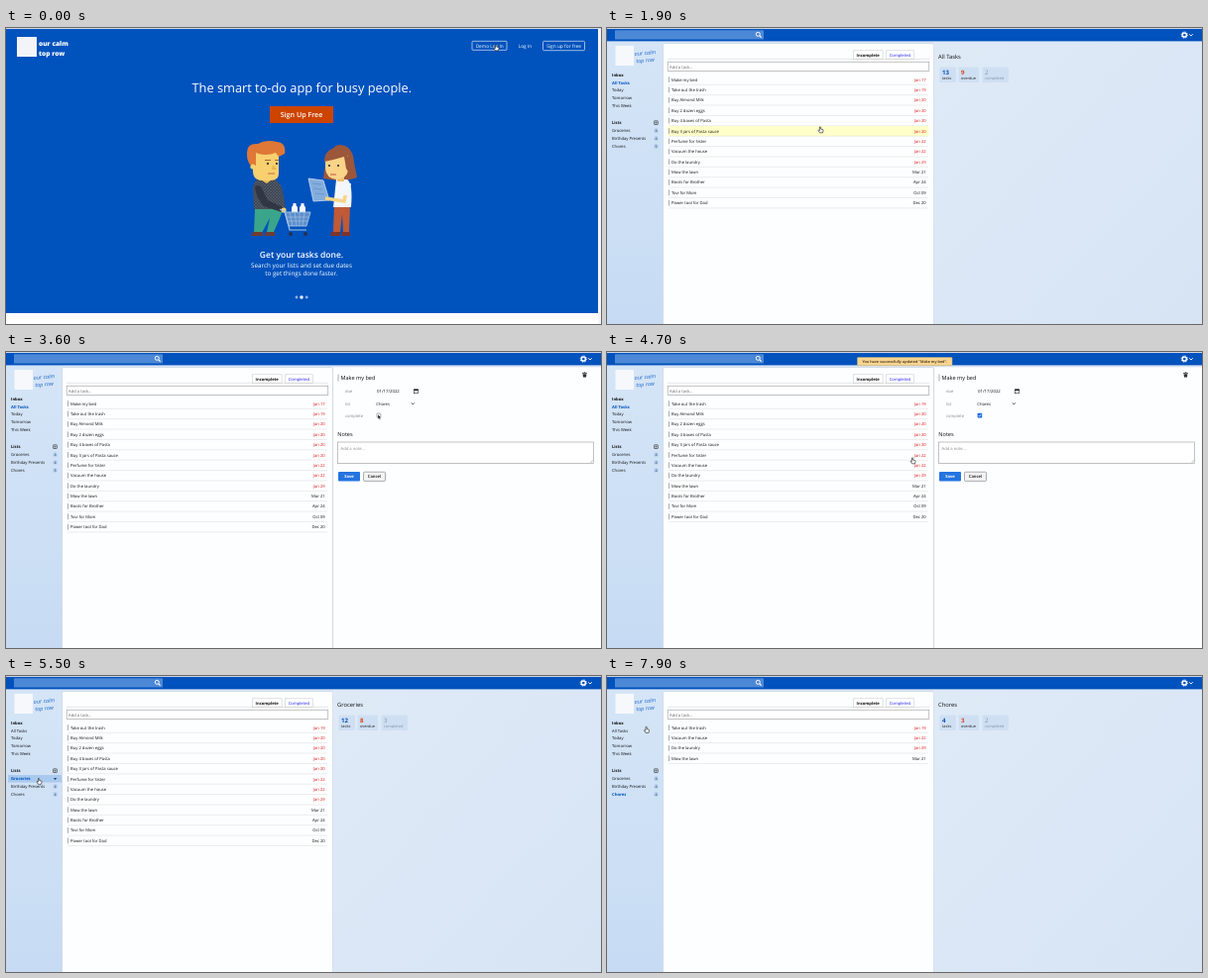
Animation of 600x299 px, one loop 8000 ms. Source, as an HTML page:

```html
<!DOCTYPE html>
<html lang="en">
<head>
<meta charset="utf-8">
<title>To-do app demo</title>
<style>
html, body { margin: 0; width: 100%; height: 100%; overflow: hidden; background: #fff; }
svg { display: block; width: 600px; height: 299px; }
text { font-family: "Open Sans", sans-serif; text-rendering: geometricPrecision; white-space: pre; }
</style>
</head>
<body>
<svg viewBox="0 0 600 299">
  <defs>
    <linearGradient id="side" x2="0" y2="1"><stop stop-color="#d5e5f7"/><stop offset="1" stop-color="#c6dbf3"/></linearGradient>
    <linearGradient id="panel" x2="1" y2="1"><stop stop-color="#dfeaf7"/><stop offset="1" stop-color="#d6e4f4"/></linearGradient>
    <pattern id="knit" width="3" height="3" patternUnits="userSpaceOnUse"><path d="M0 0L3 3M3 0L0 3" stroke="#68707c" stroke-width=".45"/></pattern>
  </defs>
  <g id="scene"></g>
  <g id="cursor">
    <path id="hand" d="M-.5 0Q.3-.7.7.2V2.1L2.7 2.6Q3.2 2.8 3 3.7L2.5 5.8H-.5L-2 3.4Q-1.5 2.8-.6 3.5Z" fill="#fff" stroke="#111" stroke-width=".6"/>
    <path id="arrow" d="M0 0V4.6L1.1 3.7L1.9 5.4L2.7 5L1.9 3.4H3.3Z" fill="#111" stroke="#fff" stroke-width=".35"/>
  </g>
</svg>
<script>
const $ = id => document.getElementById(id);
const LOOP = 8000, FS = 4.17, ROW = 10.38;
const BLUE = '#0052bd', INK = '#111';

const LISTS = ['Groceries', 'Birthday Presents', 'Chores'];
// name, due date, list index
const TASKS = [
  ['Make my bed', 'Jan 17', 2], ['Take out the trash', 'Jan 19', 2],
  ['Buy Almond Milk', 'Jan 20', 0], ['Buy 2 dozen eggs', 'Jan 20', 0],
  ['Buy 4 boxes of Pasta', 'Jan 20', 0], ['Buy 3 jars of Pasta sauce', 'Jan 20', 0],
  ['Perfume for Sister', 'Jan 22', 1], ['Vacuum the house', 'Jan 22', 2],
  ['Do the laundry', 'Jan 29', 2], ['Mow the lawn', 'Mar 21', 2],
  ['Boots for Brother', 'Apr 24', 1], ['Tovi for Mom', 'Oct 09', 1],
  ['Power tool for Dad', 'Dec 20', 1]
];

// time, x, y of the pointer tip
const MOVES = [
  [0, 494, 17], [700, 494, 17.5], [900, 472, 30], [1700, 215, 100], [2000, 215, 100],
  [2300, 163, 53.5], [2800, 163, 53.5], [3500, 375, 63], [3800, 375, 63], [4200, 346, 124],
  [4600, 346, 124], [4700, 308, 107], [5300, 33, 103.5], [6000, 33, 103.5], [6200, 33, 109],
  [6400, 33, 109], [6600, 33, 117], [7600, 33, 117], [7900, 39.5, 51.5], [8000, 39.5, 51.5]
];

// y is the middle of the capitals
const text = (x, y, s, o = {}) => {
  const z = o.size || FS;
  return `<text x="${x}" y="${y + z * .36}" font-size="${z}" fill="${o.fill || INK}" font-weight="${o.weight || 400}"` +
    ` text-anchor="${o.anchor || 'start'}" ${o.more || ''}>${s}</text>`;
};
const box = (x, y, w, h, fill, more = '') =>
  `<rect x="${x}" y="${y}" width="${w}" height="${h}" fill="${fill}" ${more}/>`;
const path = (d, fill, stroke = 'none', w = .7) =>
  `<path d="${d}" fill="${fill}" stroke="${stroke}" stroke-width="${w}"/>`;
const line = (d, stroke, w) => path(d, 'none', stroke, w);
const dot = (x, y, r, fill) => `<circle cx="${x}" cy="${y}" r="${r}" fill="${fill}"/>`;

const man = () =>
  path('M251 183H279L277 190L270 206H263L266 192L258 207H250Z', '#3aa58a') +
  path('M249 206H259V210H247ZM262 206H271V210H261Z', '#703c32') +
  path('M254 153H271Q277 156 279 165L282 183H250L249 161Q250 155 254 153Z', '#3b4350') +
  path('M254 153H271Q277 156 279 165L282 183H250L249 161Q250 155 254 153Z', 'url(#knit)') +
  path('M258 149H267V154L263 157L258 154Z', '#eebb58') +
  path('M249 125H275V147Q275 154 267 154H257Q249 153 249 145Z', '#f8d06f') +
  path('M243 128Q242 116 254 117Q262 112 273 115Q283 116 281 127L275 130L272 126Q262 130 252 126L252 139H247Q243 135 243 128Z', '#df7836') +
  dot(249, 140, 2.6, '#f8d06f') + dot(264, 137, 1.1, '#222') + dot(273, 137, 1.1, '#222') +
  line('M261 133.5H267M271 133.5H275', '#a9542a', .9) + path('M269 138L273 143H268Z', '#eab34f') + line('M264 147H271', '#b0533c', .8) +
  path('M251 160Q255 157 258 162L264 174L279 181L278 186L260 180Q252 171 251 160Z', '#303743') + dot(280, 184, 2.6, '#f8d06f');

const cart = () =>
  [288, 296].map(x => path(`M${x} 187V181L${x + 1.5} 179V177H${x + 4.5}V179L${x + 6} 181V187Z`, '#f4f8ff')).join('') +
  path('M281 186H307L303 200H285Z', '#5d8fcb', '#a8c4e6', .9) +
  line('M286 186L289 200M291 186L293 200M296 186V200M301 186L299 200M283 191H305M284 195H304', '#a8c4e6', .6) +
  line('M276 183L281 185L286 204H303', '#a8c4e6', 1.1) + dot(287, 208, 2, '#23334f') + dot(302, 208, 2, '#23334f');

const woman = () =>
  path('M320 152Q324 118 337 118Q350 119 351 136L354 151L340 155Z', '#9c573b') +
  path('M331 178H347L346 206H340L339 188L337 206H330Z', '#c05a37') +
  path('M328 206H337V210H327ZM339 206H347V210H338Z', '#7c342a') +
  path('M333 153H344Q350 157 348 181H330Z', '#f3f6fa') + path('M334 149H341V155H334Z', '#edbd73') +
  path('M322 129Q333 123 345 129V144Q343 153 333 153Q323 152 322 142Z', '#f9d388') +
  path('M321 135Q321 122 334 121Q348 122 347 148L343 142L341 130Q331 133 321 135Z', '#9c573b') +
  dot(326, 139, 1, '#222') + dot(335, 139, 1, '#222') + line('M327 148H333', '#c2463c', .9) +
  path('M305 152L320 154L326 174L310 175Z', '#84addd', '#c7dbf1', .8) +
  line('M309 157L318 158M310 162L319 163M312 167L321 168', '#5d8fcb', .7) +
  line('M344 160L341 175L322 172', '#f9d388', 3.6) + path('M342 157H348L346 169H340Z', '#f3f6fa');

function home() {
  const white = { fill: '#fff', anchor: 'middle' }, at = (x, y, s, size, o) => text(x, y, s, { ...white, size, ...o });
  const frame = 'rx="1" stroke="#dfe9fa" stroke-width=".7"';
  const brand = { size: 7, weight: 800, fill: '#fff' };
  return box(0, 0, 600, 299, '#fff') + box(0, 1, 597, 287, BLUE) + box(0, 0, 600, 1, '#d3d9e4') + box(597, 1, 3, 298, '#f3f5f9') +
    box(11, 9, 20, 20, '#f2f4f8') + text(33, 16, 'our calm', { ...brand, size: 6.6 }) + text(33, 25.5, 'top row', { ...brand, size: 6.6 }) +
    box(470, 13.3, 35, 9, 'none', frame) + at(487.7, 18, 'Demo Log In', 4.75) +
    at(523.5, 18, 'Log In', 4.75) + box(541.5, 13.3, 42, 9.4, 'none', frame) + at(562.5, 18, 'Sign up for free', 4.85) +
    at(298.3, 60.5, 'The smart to-do app for busy people.', 12.8) +
    box(266, 79, 64, 17, '#cc4400') + at(298, 87.3, 'Sign Up Free', 7.1, { weight: 600 }) +
    man() + woman() + cart() +
    at(298, 229, 'Get your tasks done.', 8.5, { weight: 600 }) +
    at(298, 240, 'Search your lists and set due dates', 6.3) + at(298, 248, 'to get things done faster.', 6.3) +
    dot(293, 272, 1.4, '#8fb3e6') + dot(298, 272, 1.7, '#fff') + dot(303.2, 272, 1.4, '#8fb3e6');
}

function topBar(banner) {
  let s = box(0, 0, 600, 1, '#c9d3e3') + box(0, 1, 600, 12.4, BLUE) + box(8, 2.2, 150, 9.4, '#4d88d6', 'rx=".6"') +
    line('M154 8L155.6 9.6', '#fff', 1.1) + `<circle cx="152.3" cy="6.3" r="2" fill="none" stroke="#fff"/>` +
    `<circle cx="582.3" cy="7" r="2.1" fill="none" stroke="#fff" stroke-width="1.5"/>` +
    `<circle cx="582.3" cy="7" r="3.1" fill="none" stroke="#fff" stroke-width=".9" stroke-dasharray="1.2 1.23"/>` +
    line('M587.2 6.2L589 8L590.8 6.2', '#fff', .9);
  if (banner) s += box(252.5, 5.5, 95.5, 8.2, '#f8d592', 'rx=".8" stroke="#d9b469" stroke-width=".5"') +
    text(300.3, 9.6, 'You have successfully updated "Make my bed".', { size: 3.8, weight: 600, anchor: 'middle', fill: '#3a2a10' });
  return s;
}

function sidebar(v) {
  const brand = { size: 6.2, fill: '#1b66c9', more: 'font-style="italic"' };
  let s = box(0, 13.4, 57, 286, 'url(#side)') + box(8.5, 18, 18.5, 20, '#f6f8fb') +
    `<g transform="rotate(-5 28 30)">${text(28, 26, 'our calm', { ...brand, size: 5.5 })}${text(29, 33.5, 'top row', { ...brand, size: 5.5 })}</g>`;
  ['Inbox', 'All Tasks', 'Today', 'Tomorrow', 'This Week'].forEach((n, i) => {
    const on = i === 1 && v.pick < 0;
    s += text(5, 47.2 + 7.85 * i, n, { weight: on || !i ? 700 : 400, fill: on ? BLUE : INK });
  });
  s += text(5, 95.6, 'Lists', { weight: 700 }) +
    box(47.6, 93.8, 3.7, 3.7, 'none', 'rx=".4" stroke="#222" stroke-width=".6"') + line('M48.5 95.65H50.4M49.45 94.7V96.6', '#222', .5);
  if (v.loaded) LISTS.forEach((n, i) => {
    const y = 103.7 + 7.9 * i, on = v.pick === i;
    if (v.side === i) s += box(2, y - 3.8, 54, 7.7, '#a9c9ee', 'rx=".6"');
    s += text(5, y, n, { weight: on ? 700 : 400, fill: on ? BLUE : INK });
    s += v.side === i ? path(`M47.9 ${y - .8}H51.3L49.6 ${y + 1.2}Z`, '#1d3f73')
      : box(47, y - 2.5, 5, 5, '#bdd3ee', 'rx="2"') + text(49.5, y, i === 2 && !v.done ? 5 : 4, { size: 3.7, anchor: 'middle', weight: 600, fill: '#31557f' });
  });
  return s;
}

function list(v) {
  const edge = 'stroke="#c4c4c4" stroke-width=".5"';
  let s = box(56.5, 15.5, 273, 290, '#fdfeff', 'rx="2" stroke="#c3cfdd" stroke-width=".6"') +
    box(248.3, 22.8, 29.8, 8.5, '#fff', edge) + text(263.2, 27.2, 'Incomplete', { size: 4.1, weight: 700, anchor: 'middle' }) +
    box(281.3, 22.8, 28, 8.5, '#fff', edge) + text(295.4, 27.2, 'Completed', { anchor: 'middle', fill: '#1616f0' }) +
    line('M61 31.3H325', '#c9c9c9', .5) +
    box(61.2, 34.2, 263.6, 9.3, '#fff', 'stroke="#999" stroke-width=".6"') + text(63, 39, 'Add a task...', { fill: '#666' });
  if (!v.loaded) return s + text(193, 56, 'You have no incomplete tasks in this list. Woohoo!', { size: 4.1, anchor: 'middle', fill: '#777', more: 'font-style="italic"' });
  v.rows.forEach(([name, due], i) => {
    const y = 52.1 + ROW * i;
    if (v.row === i) s += box(61.5, y - 5, 263, 10.2, '#ffffc9');
    s += line(`M62.5 ${y - 2.9}V${y + 2.9}`, '#8b8b8b', .7) + text(65, y, name) +
      text(321.7, y, due, { anchor: 'end', fill: due[0] === 'J' && due[1] === 'a' ? '#e01010' : INK }) +
      line(`M62 ${y + 5.2}H324`, '#d9d9d9', .5);
  });
  return s;
}

function stats(v) {
  let s = box(329.8, 13.4, 271, 286, 'url(#panel)') + text(334, 29, v.title, { size: 5.83 });
  const parts = v.loaded
    ? [[338, 'tasks', BLUE, 15], [357, 'overdue', '#e0401c', 19], [381, 'completed', '#8494a8', 25]]
    : [[338, 'tasks', BLUE, 15], [357, 'completed', '#8494a8', 24]];
  parts.forEach(([x, label, fill, w], i) => {
    s += box(x - 2.5, 39.5, w + 1.5, 15.5, '#cfdff3', 'rx="1"') +
      text(x, 45.2, v.nums[i], { size: 6.1, weight: label === 'completed' ? 400 : 700, fill }) +
      text(x, 50.5, label, { size: 3.9, fill: label === 'completed' ? fill : '#222' });
  });
  return s;
}

function details(v) {
  const grey = { fill: '#888' };
  return box(0, 13.4, 600, 2.2, '#d9e5f4') + box(329.8, 15.6, 271, 290, '#fdfeff') + line('M329.6 16V299', '#c3cfdd', .6) +
    line('M335 22.5V29.5', '#888', .7) + text(337.4, 26, TASKS[0][0], { size: 5.6 }) +
    path('M581.6 22.2H585.4L585 25.6H582Z', '#333') + line('M581 21.4H586M582.7 20.7H584.3', '#333', .8) +
    text(342, 39.8, 'due', grey) + text(374, 39.8, '01/17/2022', { size: 4.3 }) +
    box(411.4, 38, 4.2, 3.8, 'none', 'stroke="#222" stroke-width=".6"') + box(411.2, 37.5, 4.6, 1.5, '#222') +
    text(342, 52, 'list', grey) + text(373.3, 52, 'Chores') + line('M408.7 51.3L410.3 52.9L411.9 51.3', '#222', .8) +
    text(342, 64, 'complete', grey) +
    (v.checked ? box(373.6, 61.8, 4.6, 4.6, '#1769df', 'rx=".7"') + line('M374.7 64.2L375.6 65.2L377.2 63', '#fff', .7)
      : box(373.9, 62.1, 4, 4, '#fff', 'rx=".6" stroke="#777" stroke-width=".6"')) +
    text(334.3, 83, 'Notes', { size: 5.6 }) +
    box(334.3, 91, 258, 21.4, '#fff', 'stroke="#999" stroke-width=".6"') + text(337.5, 97, 'Add a note...', grey) +
    line('M591.5 109.3L589.3 111.6M591.5 110.6L590.5 111.6', '#777', .4) +
    box(335, 121, 22, 9.6, '#2474e0', 'rx="1"') + text(346, 125.8, 'Save', { weight: 700, fill: '#fff', anchor: 'middle' }) +
    box(360.5, 121.2, 22, 9.2, '#f3f3f3', 'rx="1" stroke="#777" stroke-width=".6"') + text(371.4, 125.8, 'Cancel', { weight: 600, anchor: 'middle' });
}

function pointer(t) {
  const i = MOVES.findIndex(m => m[0] > t), [t0, x0, y0] = MOVES[i - 1], [t1, x1, y1] = MOVES[i];
  const k = (t - t0) / (t1 - t0);
  return [x0 + (x1 - x0) * k, y0 + (y1 - y0) * k];
}

function view(t, x, y) {
  const done = t >= 4600, pick = t < 5400 ? -1 : t < 6300 ? 0 : t < 6800 ? 1 : 2;
  const shown = t < 5600 ? -1 : t < 6400 ? 0 : t < 7000 ? 1 : 2;
  const rows = TASKS.filter((r, i) => (i || !done) && (shown < 0 || r[2] === shown));
  const late = rows.filter(r => r[1].startsWith('Jan')).length;
  const loaded = t >= 800, inList = x > 62 && x < 325 && t < 4600;
  const sideRow = Math.floor((y + .7 - 99.8) / 7.9);
  return {
    done, pick, rows, loaded,
    title: pick < 0 ? 'All Tasks' : LISTS[pick],
    nums: loaded ? [rows.length, late, shown < 0 ? 2 + done : [1, 0, 2][shown]] : [0, 0],
    row: inList ? Math.floor((y - 47) / ROW) : -1,
    side: x < 56 && sideRow >= 0 ? sideRow : -1,
    checked: t >= 3800, editing: t >= 2300 && t < 5400, banner: t >= 4500 && t < 5100
  };
}

let last = '';
function draw(now) {
  const t = Math.floor(now % LOOP / 100) * 100, [x, y] = pointer(t);
  const v = view(t, x, y), onApp = t >= 300;
  const html = onApp
    ? (v.editing ? details(v) : stats(v) + box(57, 13.4, 273, 3, '#dbe7f5')) + sidebar(v) + list(v) + topBar(v.banner)
    : home();
  if (html !== last) $('scene').innerHTML = last = html;
  $('cursor').setAttribute('transform', `translate(${x} ${y})`);
  const arrow = onApp && x > 330 && y < 115;
  $('arrow').style.display = arrow ? '' : 'none';
  $('hand').style.display = arrow ? 'none' : '';
}

const start = performance.now();
function tick() {
  draw(performance.now() - start);
  requestAnimationFrame(tick);
}
tick();
</script>
</body>
</html>
```
